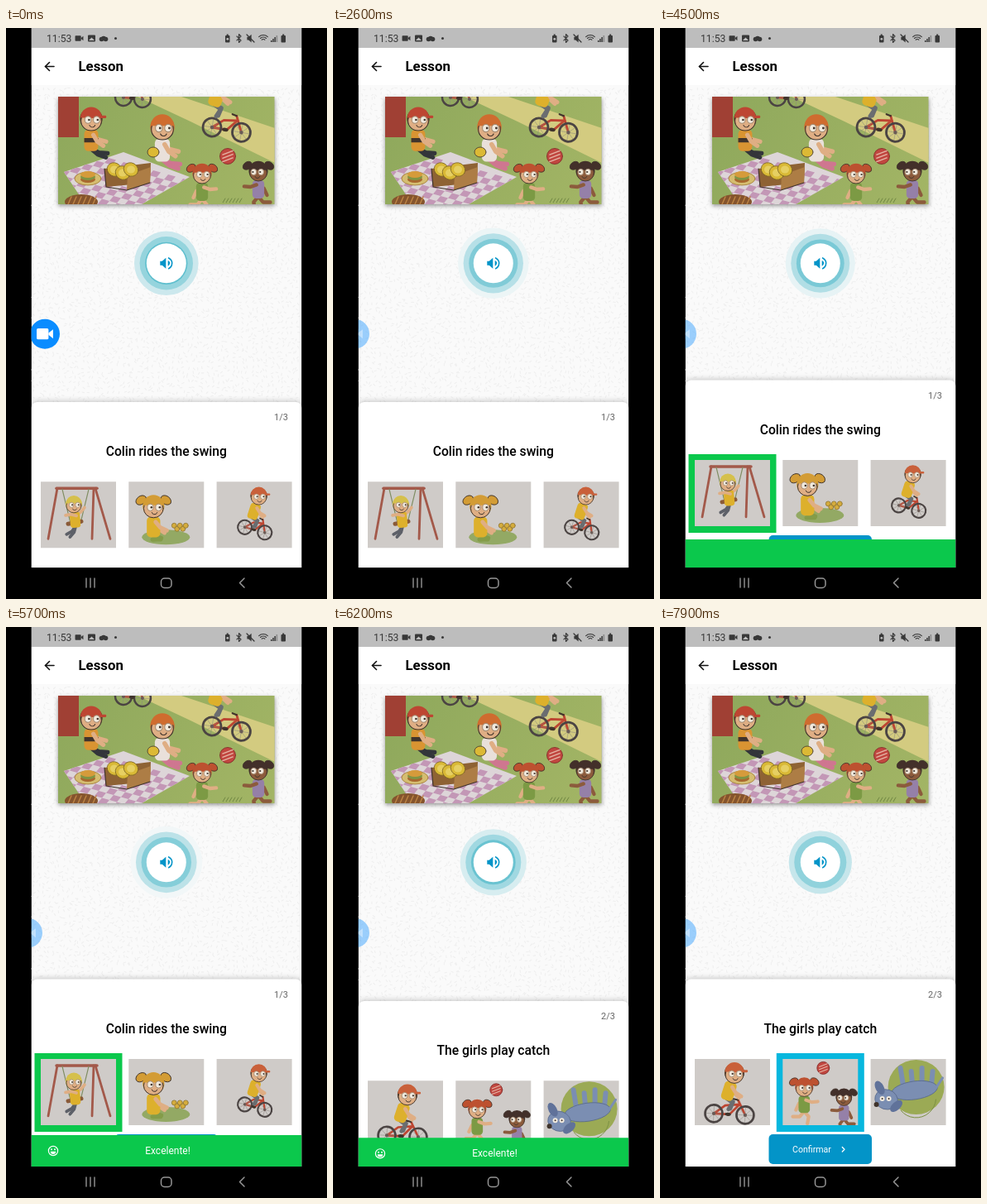
An HTML page with a canvas for the animation above (8 s loop, 388 by 690 pixels).

```html
<!DOCTYPE html>
<html lang="en">
<head>
<meta charset="utf-8">
<title>Lesson</title>
<style>
html, body { margin: 0; width: 388px; height: 690px; overflow: hidden; background: #000; }
canvas { display: block; width: 388px; height: 690px; }
</style>
</head>
<body>
<canvas id="stage"></canvas>
<script>
const W = 388, H = 690, LOOP = 8000, TAU = Math.PI * 2;
const LEFT = 30.6, RIGHT = 357.4, BOTTOM = 652, CENTER = 193.8;
const canvas = document.getElementById('stage');
const c = canvas.getContext('2d');
const dpr = window.devicePixelRatio || 1;
canvas.width = W * dpr;
canvas.height = H * dpr;

const INK = '#40342c', RED = '#bd4632', YELLOW = '#ddb02c', SKIN = '#dfae84', BROWN = '#8c5b3c';
const BLUE = '#0394c8', GREEN = '#0bc84c', CYAN = '#07b7de';

// Drawing helpers
const clamp = v => Math.max(0, Math.min(1, v));
const span = (t, from, to) => clamp((t - from) / (to - from));
const easeOut = k => 1 - (1 - k) ** 3;
const rad = degrees => degrees * TAU / 360;

function rect(color, x, y, w, h, r = 0) {
  c.fillStyle = color;
  c.beginPath();
  c.roundRect(x, y, w, h, r);
  c.fill();
}
function oval(color, x, y, rx, ry = rx, angle = 0, outline) {
  c.beginPath();
  c.ellipse(x, y, rx, ry, rad(angle), 0, TAU);
  c.fillStyle = color;
  c.fill();
  if (outline) { c.strokeStyle = outline; c.lineWidth = .8; c.stroke(); }
}
function trace(pts) {
  c.beginPath();
  for (let i = 0; i < pts.length; i += 2) c.lineTo(pts[i], pts[i + 1]);
}
function poly(color, ...pts) {
  trace(pts);
  c.fillStyle = color;
  c.fill();
}
function line(color, width, ...pts) {
  trace(pts);
  c.strokeStyle = color;
  c.lineWidth = width;
  c.lineCap = c.lineJoin = 'round';
  c.stroke();
}
function arc(color, width, x, y, r, from = 0, to = 360) {
  c.beginPath();
  c.arc(x, y, r, rad(from), rad(to));
  c.strokeStyle = color;
  c.lineWidth = width;
  c.stroke();
}
function dome(color, x, y, r, from = 180, to = 360) {
  c.beginPath();
  c.arc(x, y, r, rad(from), rad(to));
  c.fillStyle = color;
  c.fill();
}
function text(str, x, y, size, color, weight = 400, align = 'left') {
  c.font = `${weight} ${size}px Roboto, sans-serif`;
  c.textAlign = align;
  c.fillStyle = color;
  c.fillText(str, x, y);
}
function group(draw, { x = 0, y = 0, sx = 1, sy = sx, turn = 0, alpha = 1 } = {}) {
  c.save();
  c.translate(x, y);
  c.scale(sx, sy);
  c.rotate(rad(turn));
  c.globalAlpha *= alpha;
  draw();
  c.restore();
}
function clipped(x, y, w, h, draw) {
  c.save();
  c.beginPath();
  c.rect(x, y, w, h);
  c.clip();
  draw();
  c.restore();
}
function withShadow(color, blur, dy, draw) {
  c.save();
  c.shadowColor = color;
  c.shadowBlur = blur * dpr;
  c.shadowOffsetY = dy * dpr;
  draw();
  c.restore();
}

// Characters: limbs are two segments, given by their angles
const POSES = {
  run: { arms: [20, 140], legs: [50, 130], bend: 50 },
  ride: { arms: [40, 50], legs: [10, 20], bend: 85, lean: 18 },
  sit: { arms: [60, 40], legs: [25, 40], bend: -20 },
  swing: { arms: [200, -20], legs: [130, 110], bend: 25, lean: -5 },
  kneel: { arms: [50, 60], legs: [20, 30], bend: 150 },
};
const LOOKS = {
  father: { hair: '#5a3321', shirt: '#d99432', pants: '#33353a', cap: RED, stripe: INK },
  mother: { hair: '#cf6c2f', shirt: '#e9e0da', pants: '#cf7690' },
  redhead: { hair: '#bd5130', shirt: '#7c9a44', tails: true },
  friend: { skin: BROWN, hair: '#43302a', shirt: '#9580a8', tails: true },
  rider: { hair: '#59402d', shirt: YELLOW, pants: '#6a6d70', cap: '#c9603a' },
  boy: { hair: '#d5c04c', shirt: YELLOW, pants: '#5d6068' },
  gardener: { hair: '#d39c35', shirt: YELLOW, pants: '#849c49', tails: true },
};
function limb(color, x, y, length, a, b) {
  const kneeX = x + length * Math.cos(rad(a)), kneeY = y + length * Math.sin(rad(a));
  line(color, 4, x, y, kneeX, kneeY, kneeX + length * Math.cos(rad(b)), kneeY + length * Math.sin(rad(b)));
}
function person(x, y, size, look, pose, dir = 1) {
  const { skin = SKIN, hair, shirt, pants = skin, cap, tails, stripe } = LOOKS[look];
  const { arms, legs, bend, lean = 0 } = POSES[pose];
  const body = () => {
    legs.forEach(a => limb(pants, 0, 27, 8, a, a + bend));
    limb(skin, 0, 13, 8, arms[1], arms[1] - 25);
    rect(shirt, -6.5, 9, 13, 20, 4);
    if (stripe) rect(stripe, -6.5, 17, 13, 4);
    limb(skin, 2, 14, 7, arms[0], arms[0] - 25);
  };
  group(() => {
    group(body, { turn: lean });
    if (tails) for (const side of [-1, 1]) oval(hair, side * 12, -7, 5.5, 4, side * 35, INK);
    oval(hair, 0, -1, 10.5, 10);
    oval(skin, 0, 1, 9.5, 9, 0, INK);
    dome(cap || hair, 0, -2, 10);
    if (cap) rect(cap, 0, -4, 14, 2.5, 1);
    for (const side of [-1, 1]) {
      oval('#f1eade', 1 + side * 4, 0, 3, 3.3, 0, '#a58a70');
      oval(INK, 2 + side * 4, 0, 1);
    }
    arc(INK, .8, 1, 4, 2.8, 20, 160);
  }, { x, y, sx: size * dir, sy: size });
}
function bike(x, y, base, r, turn = 0) {
  group(() => {
    line(RED, r * .26, 0, 0, base * .35, -r, base * .8, -r * 1.2, base * .5, 0, 0, 0);
    line(RED, r * .26, base, 0, base * .75, -r * 1.7);
    line(INK, r * .2, base * .75, -r * 1.7, base * .6, -r * 1.8);
    for (const hub of [0, base]) {
      for (let a = 0; a < 180; a += 45) {
        const dx = r * Math.cos(rad(a)), dy = r * Math.sin(rad(a));
        line('#8b8780', .5, hub - dx, -dy, hub + dx, dy);
      }
      arc('#4b4443', r * .25, hub, 0, r);
      oval('#6a5b56', hub, 0, r * .2);
    }
    oval(INK, base * .45, 0, r * .35, r * .2);
  }, { x, y, turn });
}
function ball(x, y, r) {
  oval('#c14740', x, y, r, r, 0, '#7d2826');
  for (const d of [-.45, 0, .45])
    line('#e5b5a5', r * .14, x - r * .65, y + r * (d + .25), x + r * .65, y + r * (d - .25));
}

// Lesson picture
function blanket() {
  c.save();
  trace([70, 174, 142, 150, 222, 180, 164, 213, 96, 213]);
  c.clip();
  rect('#ddd5d8', 63, 140, 170, 75);
  c.transform(9, 2.5, -5, 6, 70, 142);
  for (let row = 0; row < 14; row++)
    for (let col = row % 2; col < 20; col += 2) rect('#c397b6', col, row, 1, 1);
  c.restore();
}
function picnic() {
  oval('#d5bd70', 99, 182, 16, 8, 0, '#a17c36');
  for (let i = 0; i < 3; i++) oval(['#a8682f', '#809444', '#d59b3b'][i], 99, 183 - i * 3, 9, 4);
  poly('#8e6234', 119, 170, 175, 163, 174, 187, 121, 192);
  poly('#ad7d45', 147, 178, 175, 168, 174, 187, 146, 196);
  for (let i = 0; i < 3; i++) {
    const x = 131 + i * 10, y = 171 + i % 2 * 4;
    oval('#d9b936', x, y, 9, 8, 30, '#776022');
    oval('#e6cf62', x, y, 5, 4.5);
  }
  line(INK, 1.2, 119, 170, 121, 192, 146, 196, 174, 187);
}
function lessonPicture() {
  const x = 63, y = 83, w = 261.5, h = 130;
  const grass = c.createLinearGradient(x, y, x + w, y + h);
  grass.addColorStop(0, '#8ea85c');
  grass.addColorStop(1, '#a3b565');
  withShadow('rgba(0,0,0,.4)', 5, 2, () => rect(grass, x, y, w, h));
  clipped(x, y, w, h, () => {
    poly('#d3cb80', 159, 83, 212, 83, 325, 121, 325, 163, 223, 113);
    rect('#a04034', 63, 83, 25, 49);
    blanket();
    person(103, 111, 1.3, 'father', 'sit');
    picnic();
    person(189, 121, 1.4, 'mother', 'sit');
    oval('#dcb935', 178, 150, 7, 6, 0, INK);
    bike(142, 84, 23, 10, 5);
    bike(249, 120, 36, 11, 10);
    person(262, 60, 1.25, 'rider', 'ride');
    ball(268, 155, 9.5);
    person(237, 177, 1.1, 'redhead', 'run');
    person(305, 174, 1.1, 'friend', 'run', -1);
    oval('#85542d', 91, 210, 20, 9);
    for (let i = 0; i < 6; i++) {
      line('#bd8445', 1.4, 75 + i * 6, 213, 79 + i * 6, 204);
      line('#708743', 1, 262 + i * 4, 211, 265 + i * 4, 206);
    }
  });
}

// Answer pictures, each 91 by 80
const CARD = { w: 91, h: 80 };
function swing() {
  const wood = '#a3594a';
  for (const [top, foot] of [[20, 9], [66, 84], [64, 62]]) line(wood, 2.8, top, 8, foot, 69);
  line(wood, 3.5, 19, 8, 68, 8);
  for (const [top, seat] of [[26, 36], [58, 48]]) line('#7f8d62', 1.2, top, 9, seat, 50);
  line('#8a5a38', 5, 33, 51, 49, 48);
  person(40, 28, .95, 'boy', 'swing');
}
function garden() {
  oval('#93a964', 45, 67, 29, 9);
  person(30, 31, 1.25, 'gardener', 'kneel');
  for (let i = 0; i < 5; i++) oval('#d5ac3c', 55 + i * 3.5, 53 + i % 2 * 4, 3, 3, 0, '#8c7434');
}
function cyclist() {
  bike(34, 55, 25, 8.5, 15);
  person(51, 18, .98, 'rider', 'ride');
}
function racer() {
  bike(23, 66, 38, 10.5, 3);
  person(48, 18, 1.15, 'rider', 'ride');
}
function catchers() {
  ball(49, 11, 7.5);
  person(26, 35, 1.05, 'redhead', 'run');
  person(74, 47, .95, 'friend', 'run', -1);
}
function dog() {
  const fur = '#7b8eb2', edge = '#55668a';
  oval('#9baa55', 55, 34, 34, 33);
  arc('#7c9143', 1, 55, 47, 24, 5, 140);
  for (let i = 0; i < 4; i++) line(fur, 6, 40 + i * 11, 36, 36 + i * 13, 11 + i % 2 * 4);
  oval(fur, 53, 38, 28, 11, -8, edge);
  line(fur, 3, 79, 35, 87, 23);
  oval(fur, 19, 49, 14, 12, 17, edge);
  for (const side of [-1, 1]) {
    oval('#60729a', 21 + side * 10, 46 + side * 11, 5, 9, 10 + side * 38);
    oval('#f1eade', 18 + side * 4, 48, 3);
    oval(INK, 18 + side * 4, 48, 1);
  }
  oval(INK, 7, 55, 3);
}

const QUESTIONS = [
  { title: 'Colin rides the swing', count: '1/3', cards: [swing, garden, cyclist] },
  { title: 'The girls play catch', count: '2/3', cards: [racer, catchers, dog] },
];

// Screen parts
let seed = 7;
const random = () => (seed = seed * 16807 % 2147483647) / 2147483647;
const confetti = new Path2D();
for (let y = 72; y < 455; y += 6)
  for (let x = 32; x < 356; x += 6) {
    const px = x + random() * 4, py = y + random() * 4, a = random() * TAU;
    confetti.moveTo(px, py);
    confetti.lineTo(px + 2.5 * Math.cos(a), py + 2.5 * Math.sin(a));
  }

function videoIcon(color, x, y, sx) {
  group(() => {
    rect(color, -9, -6, 13, 12, 1.5);
    poly(color, 4, -1, 9, -5, 9, 5, 4, 1);
  }, { x, y, sx });
}
function speakerIcon(color, x, y, sx) {
  group(() => {
    rect(color, -7.5, -2.5, 4, 5);
    poly(color, -5, -2.5, -.5, -6.5, -.5, 6.5, -5, 2.5);
  }, { x, y, sx });
}
function statusBar() {
  const ink = '#383838', back = '#bdbdbd';
  rect(back, LEFT, 0, RIGHT - LEFT, 24);
  text('11:53', 49, 17, 12.2, ink);
  videoIcon(ink, 88.5, 12.5, .55);
  rect(ink, 99, 8.5, 9, 8, 1);
  poly(back, 100, 15, 103.5, 11.5, 107, 15);
  for (let i = -1; i <= 1; i++) oval(ink, 118 + i * 2.5, 13.5 - (i === 0), 2.8);
  oval(ink, 132.5, 12.5, 1.5);
  for (const x of [265, 332.5]) {
    rect(ink, x, 9, 5.5, 8.5, 1);
    rect(ink, x + 1.7, 7.5, 2, 2);
  }
  oval(back, 267.8, 13.3, 1.4);
  line(ink, 1.1, 279, 10, 284, 15, 281.5, 17.5, 281.5, 7.5, 284, 10, 279, 15);
  speakerIcon(ink, 297, 12.5, .75);
  line(ink, 1.3, 291, 8, 300, 17);
  for (const r of [2.5, 5, 7.5]) arc(ink, 1.2, 311, 16, r, 225, 315);
  for (let i = 0; i < 4; i++) rect(i < 3 ? ink : '#888', 320 + i * 2.2, 15 - i * 2, 1.5, 2 + i * 2);
}
function appBar() {
  rect('#fff', LEFT, 24, RIGHT - LEFT, 45);
  line('#111', 1.6, 58, 46.5, 47.5, 46.5);
  line('#111', 1.6, 52.5, 41.5, 47.5, 46.5, 52.5, 51.5);
  text('Lesson', 87.5, 52, 16.8, '#000', 700);
}
function soundButton(t) {
  const y = 284.3, from = [95, 191, 206];
  for (let wave = 2; wave >= 0; wave--) {
    const age = t % 1000 / 1000 + wave, fade = age / 2.85;
    if (fade < 1) oval(`rgb(${from.map(v => Math.round(v + (250 - v) * fade))})`, CENTER, y, 25.6 + 6.6 * age);
  }
  oval('#fff', CENTER, y, 24);
  speakerIcon(BLUE, CENTER, y, 1);
  arc(BLUE, 1.6, CENTER, y, 7, -66, 66);
  dome(BLUE, CENTER + .6, y, 3.6, -69, 69);
}
function cameraBubble(t) {
  const k = easeOut(span(t, 250, 600));
  group(() => {
    oval('#0a8cff', 0, 0, 18);
    videoIcon('#fff', 0, 0, 1.1);
  }, { x: 47 - 21 * k, y: 369.7, alpha: 1 - .6 * k });
}
function sheet({ title, count, cards }, picked, frame) {
  const raised = picked >= 0;
  group(() => {
    withShadow('rgba(0,0,0,.22)', 7, -1, () => rect('#fff', LEFT, 452, RIGHT - LEFT, 260, 7));
    text(count, 341, 474, 11, '#666', 400, 'right');
    text(title, CENTER, 517, 15.7, '#000', 500, 'center');
    cards.forEach((draw, i) => {
      const x = 42 + i * 106.3, y = 548.3;
      if (i === picked) rect(frame, x - 7.5, y - 7, 106, 95);
      rect('#cfcbc8', x, y, CARD.w, CARD.h);
      clipped(x, y, CARD.w, CARD.h, () => group(draw, { x, y }));
    });
  }, { y: raised ? -26.4 : 0 });
  if (raised) {
    rect(BLUE, 131.5, 613, 124.5, 36, 5);
    text('Confirmar', 160, 634.8, 10.6, '#fff');
    line('#fff', 1.3, 220.3, 628.5, 223, 631.2, 220.3, 634);
  }
}
function toast(t) {
  const height = 38 * easeOut(span(t, 4370, 4620)) * (1 - span(t, 6090, 6340) ** 3);
  if (height <= 0) return;
  const top = BOTTOM - height;
  rect(GREEN, LEFT, top, RIGHT - LEFT, height);
  group(() => {
    text('Excelente!', CENTER + 1.7, 23, 12, '#fff', 400, 'center');
    arc('#fff', 1.2, 57, 19, 5.6);
    for (const side of [-2, 2]) oval('#fff', 57 + side, 17.3, 1);
    dome('#fff', 57, 19.8, 3.2, 0, 180);
  }, { y: top, alpha: span(t, 4510, 4650) });
}
function navBar() {
  const ink = '#959595';
  rect('#000', 0, BOTTOM, W, H - BOTTOM);
  for (const x of [97, 102, 107]) line(ink, 1.4, x, 665, x, 676);
  c.lineWidth = 1.5;
  c.beginPath();
  c.roundRect(187.5, 665, 12.5, 11.5, 4);
  c.stroke();
  line(ink, 1.5, 288, 665, 282.5, 670.5, 288, 676);
}

function render(t) {
  c.setTransform(dpr, 0, 0, dpr, 0, 0);
  rect('#000', 0, 0, W, H);
  clipped(LEFT, 0, RIGHT - LEFT, BOTTOM, () => {
    rect('#fafafa', LEFT, 0, RIGHT - LEFT, BOTTOM);
    c.strokeStyle = '#f0f0f0';
    c.lineWidth = 1.2;
    c.stroke(confetti);
    statusBar();
    appBar();
    lessonPicture();
    soundButton(t);
    cameraBubble(t);
    const swap = easeOut(span(t, 5930, 6230));
    if (swap > 0) sheet(QUESTIONS[1], t >= 7200 ? 1 : -1, CYAN);
    if (swap < 1) group(() => sheet(QUESTIONS[0], t >= 2800 ? 0 : -1, t >= 4350 ? GREEN : CYAN), { alpha: 1 - swap });
    toast(t);
  });
  navBar();
}

const start = performance.now();
function tick() {
  render((performance.now() - start) % LOOP);
  requestAnimationFrame(tick);
}
tick();
</script>
</body>
</html>
```
